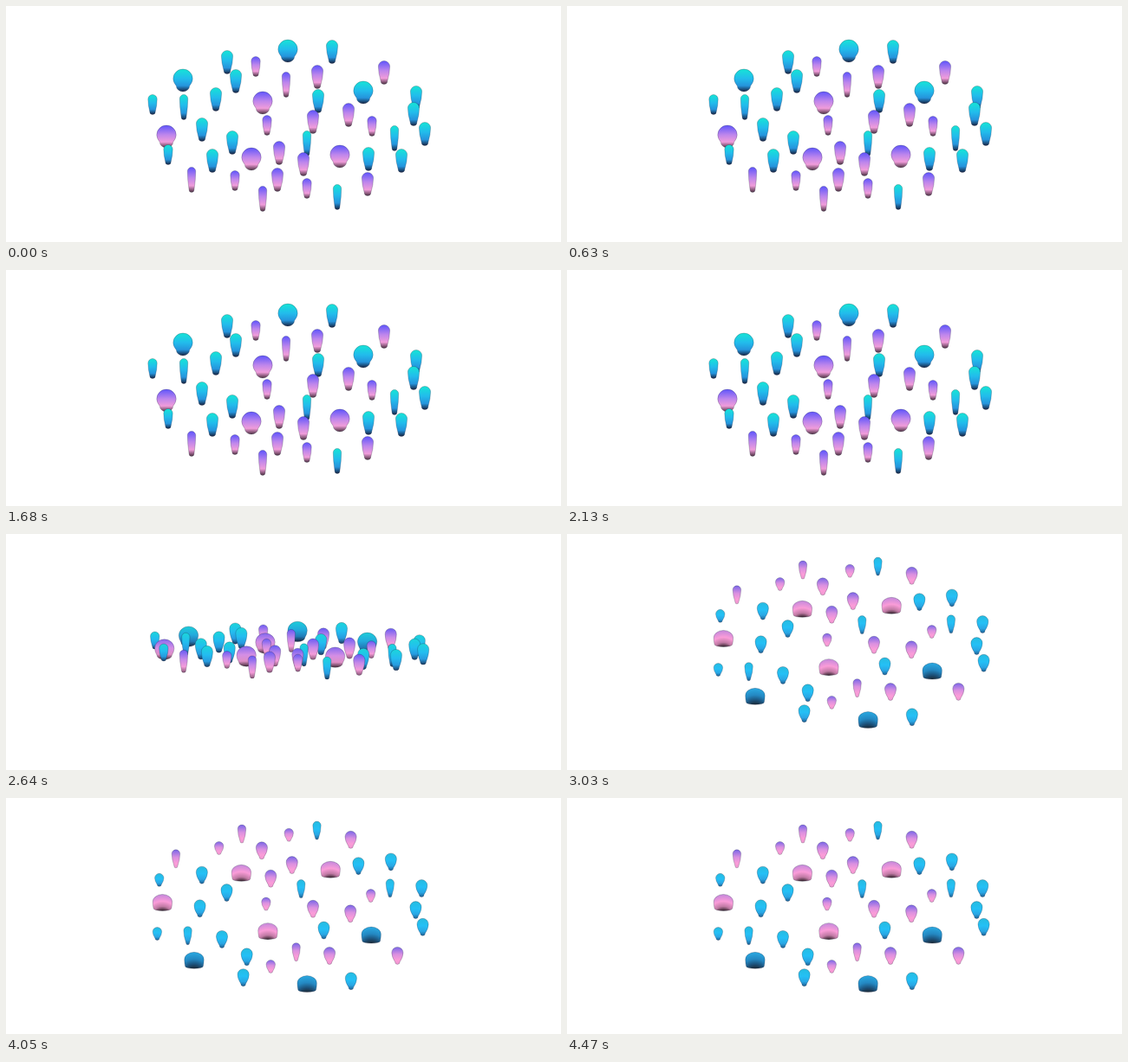
An HTML page with a canvas for the animation above (4.5 s loop, 640x273 px).

```html
<!DOCTYPE html>
<html lang="en">
<head>
<meta charset="utf-8">
<title>Tilting drops</title>
<style>
  html, body { margin: 0; width: 100%; height: 100%; overflow: hidden; background: #fff; }
  canvas { display: block; }
</style>
</head>
<body>
<canvas id="stage" width="640" height="273"></canvas>
<script>
const ctx = document.getElementById('stage').getContext('2d');
const LOOP = 4500, START = 2250, END = 3030;

const mix = (a, b, t) => a + (b - a) * t;

// Pairs are [seen from above, seen from below]; taper is tail width / head width.
const SHAPES = {
  big:   { r: 11.2, len: [26, 19], taper: [0.68, 0.92] },
  mid:   { r: 6.6,  len: [27, 20], taper: [0.58, 0.42] },
  thin:  { r: 4.7,  len: [29, 21], taper: [0.62, 0.42] },
  small: { r: 5.2,  len: [23, 15], taper: [0.62, 0.46] }
};

const COLORS = {
  cyan: {
    above: ['16e4d6', '22bcec', '2594dc', '16223f'],
    below: ['26bce0', '24c0f6', '2aa6e4', '1d5f92'],
    dome:  ['2aaae2', '2488c2', '1c5078', '1a2834']
  },
  pink: {
    above: ['5f55fb', 'be86ec', 'f09cda', '4a3040'],
    below: ['7a66e8', 'da90e0', 'fa9cd8', 'f098d0'],
    dome:  ['c488dc', 'fa9cd8', 'c07aa4', '2e2028']
  }
};
const STOPS = [0, 0.42, 0.74, 1];

// The scatter on the disc, as it lies on screen when seen from above.
const drops = [];
function scatter(shape, hue, ...spots) {
  for (const [x, y] of spots) drops.push({ shape, hue, x, y });
}
scatter('big', 'cyan', [325, 52], [204, 86], [412, 100]);
scatter('big', 'pink', [296, 112], [185, 151], [283, 177], [385, 174]);
scatter('mid', 'cyan', [255, 65], [376, 53], [265, 87], [360, 110], [242, 108], [473, 106],
  [470, 125], [483, 148], [226, 143], [261, 158], [238, 179], [418, 177], [456, 179]);
scatter('mid', 'pink', [436, 77], [359, 82], [354, 134], [395, 126], [315, 170],
  [343, 183], [313, 201], [417, 206]);
scatter('thin', 'cyan', [205, 117], [347, 159], [448, 153], [382, 221]);
scatter('thin', 'pink', [323, 91], [214, 201], [296, 223]);
scatter('small', 'cyan', [169, 114], [187, 172]);
scatter('small', 'pink', [288, 70], [301, 138], [422, 139], [264, 202], [347, 211]);
drops.sort((a, b) => a.y - b.y);

// Tilting flips the disc, turning shears it sideways, and it rolls slightly on the way.
function place({ shape, x, y }, turn, tilt) {
  const side = x - 325;
  const flipped = 271 - 1.05 * y - 0.07 * side + 1.3 * (SHAPES[shape].len[0] - 27);
  return {
    x: x + 0.27 * (134 - y) * turn,
    y: mix(y, flipped, tilt) + 0.045 * side * Math.sin(Math.PI * turn)
  };
}

function blend(a, b, t) {
  const channel = (hex, i) => parseInt(hex.slice(i, i + 2), 16);
  return 'rgb(' + [0, 2, 4].map(i => Math.round(mix(channel(a, i), channel(b, i), t))) + ')';
}

// The shading is straight from above and bends into arcs from below.
function shade(drop, len, tilt) {
  const bend = mix(200, 8, tilt);
  const { above, below, dome } = COLORS[drop.hue];
  const under = drop.shape === 'big' ? dome : below;
  const fill = ctx.createRadialGradient(0, len + bend, bend, 0, len + bend, bend + len);
  STOPS.forEach((stop, i) => fill.addColorStop(1 - stop, blend(above[i], under[i], tilt)));
  return fill;
}

function drawDrop(drop, turn, tilt) {
  const { r, len: lens, taper } = SHAPES[drop.shape];
  const len = mix(...lens, tilt), tail = r * mix(...taper, tilt);
  const head = Math.min(r, len * 0.45), base = Math.min(tail, len * mix(0.25, 0.14, tilt));
  const end = len - base, waist = mix(head, end, 0.45);
  const { x, y } = place(drop, turn, tilt);

  ctx.save();
  ctx.translate(x, y - len / 2);
  ctx.beginPath();
  ctx.ellipse(0, head, r, head, 0, Math.PI, 2 * Math.PI);
  ctx.quadraticCurveTo(r, waist, tail, end);
  ctx.ellipse(0, end, tail, base, 0, 0, Math.PI);
  ctx.quadraticCurveTo(-r, waist, -r, head);
  ctx.closePath();
  ctx.fillStyle = shade(drop, len, tilt);
  ctx.fill();
  ctx.strokeStyle = 'rgba(20,25,50,0.4)';
  ctx.lineWidth = 0.6;
  ctx.stroke();
  ctx.restore();
}

function draw(time) {
  const p = Math.min(1, Math.max(0, (time - START) / (END - START)));
  const turn = (1 - Math.cos(Math.PI * p)) / 2;
  const tilt = Math.pow(turn, 1.43);
  ctx.fillStyle = '#fff';
  ctx.fillRect(0, 0, 640, 273);
  drops.forEach(drop => drawDrop(drop, turn, tilt));
}

const begin = performance.now();
function tick() {
  draw((performance.now() - begin) % LOOP);
  requestAnimationFrame(tick);
}
tick();
</script>
</body>
</html>
```
